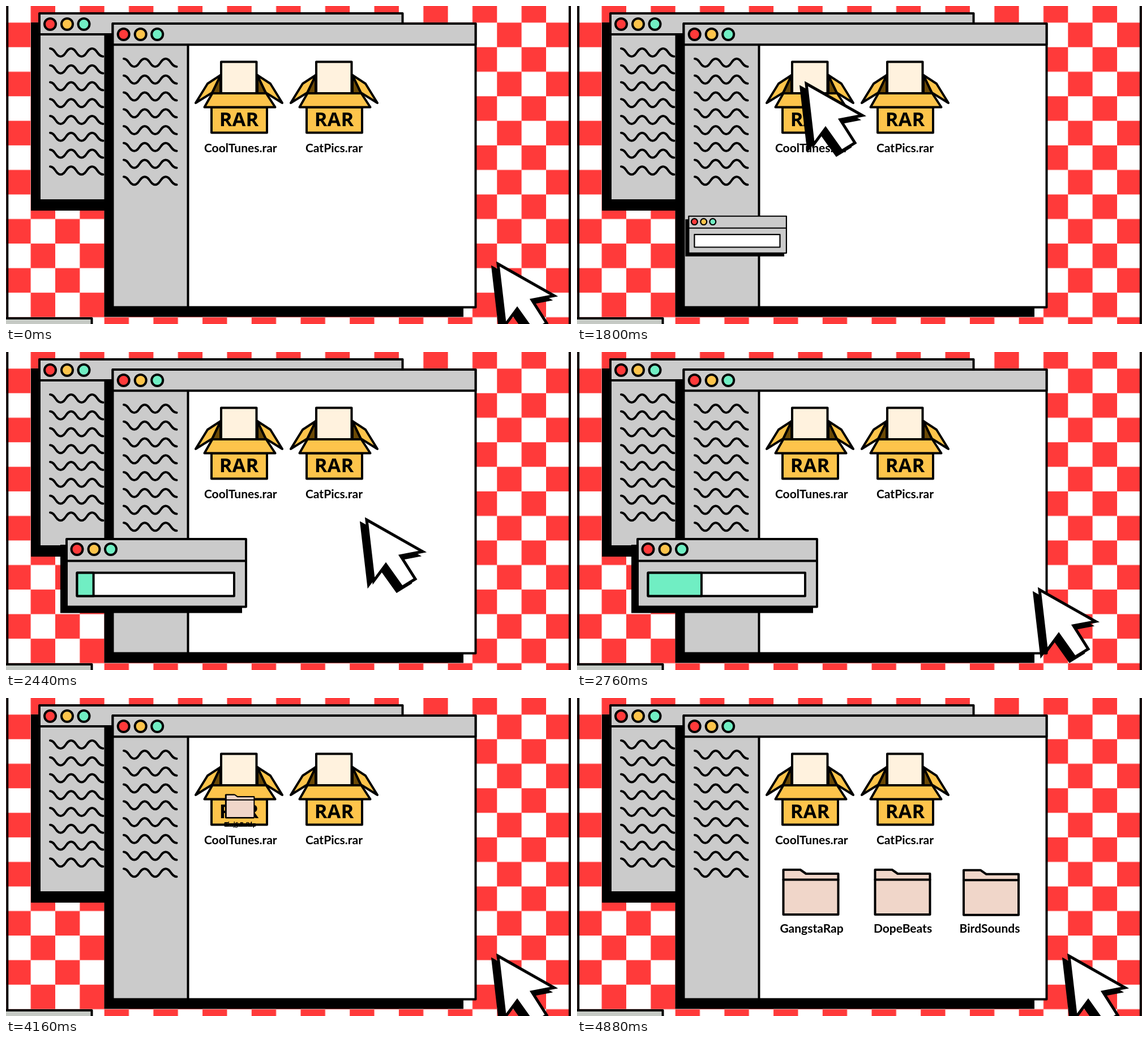
Recreate the animation shown at these times as an HTML page. Size 998 by 561 pixels, loop 6240 ms.

```html
<!DOCTYPE html>
<html lang="en">
<head>
<meta charset="utf-8">
<title>Unpacking an archive</title>
<style>
  html, body { margin: 0; width: 100%; height: 100%; overflow: hidden; background: #fff; }
  svg { display: block; width: 100vw; height: 100vh; }
  .line { stroke: #000; stroke-width: 4; stroke-linejoin: round; stroke-linecap: round; }
  .grey { fill: #cbcbcb; }
  .white { fill: #fff; }
  .yellow { fill: #fdc44b; }
  .brown { fill: #6b4a06; }
  .cream { fill: #fff2de; }
  .pink { fill: #f0d6c9; }
  .red { fill: #ff3a3a; }
  .teal { fill: #70eec3; }
  .none { fill: none; }
  text { text-anchor: middle; font: 700 21px Lato, sans-serif; }
  .tag { font: 700 34.5px "Open Sans", "Noto Sans", sans-serif; }
</style>
</head>
<body>
<svg viewBox="0 0 998 561" preserveAspectRatio="none">
  <defs>
    <pattern id="checks" x="0.3" y="-14" width="86.7" height="86.62" patternUnits="userSpaceOnUse">
      <path class="red" d="M43.35 0h43.35v43.31h-43.35zM0 43.31h43.35v43.31H0z"/>
    </pattern>
    <g id="lights" class="line">
      <circle class="red" r="10"/>
      <circle class="yellow" cx="30" r="10"/>
      <circle class="teal" cx="59.5" r="10"/>
    </g>
    <path id="wave" class="line none" d="M0 0c9 0 9.5 14 18.5 14s9.5-14 18.5-14 9.5 14 18.5 14 9.5-14 18.5-14 9.5 14 19.5 14"/>
    <g id="box" class="line">
      <path class="brown" d="M-32.5 122v32h-15zM32.5 122v32h15z"/>
      <path class="yellow" d="M-32.5 122l-23 15-21 34 29-18zM32.5 122l23 15 21 34-29-18z"/>
      <path class="cream" d="M-31.5 98.5h62.5v56h-62.5z"/>
      <path class="yellow" d="M-48.5 178.5h98v45h-98z"/>
      <path class="yellow" d="M-47 154h95l16 24.5h-125z"/>
    </g>
    <g id="folder" class="line pink">
      <path d="M-48.5 39.5v-79h30l10 7h57v72z"/>
      <path d="M-48.5-22h97"/>
    </g>
    <path id="arrow" stroke="#000" stroke-width="5" stroke-miterlimit="8" d="M0 0L99 56 60 63.5 86 104.5 62.5 119 34 79 12.5 108z"/>
  </defs>

  <rect width="998" height="561" fill="url(#checks)"/>
  <path class="line none" d="M2.3-5v571M995.8-5v571"/>
  <path class="line" fill="#c6cac5" d="M-10 551H151.5V580H-10z"/>

  <path d="M44 29h636v332H44z"/>
  <path class="line grey" d="M59 13h641.5v330H59zM59 50h641"/>
  <use href="#lights" x="78" y="32"/>
  <g id="backWaves"></g>

  <path d="M173.5 48H808v500.5H173.5z"/>
  <path class="line white" d="M188.5 31H829.5V531.5H188.5z"/>
  <path class="line grey" d="M188.5 31h641v37.300h-641zM188.500 68.300h133v463.200h-133z"/>
  <use href="#lights" x="207.700" y="50"/>
  <g id="frontWaves"></g>

  <use href="#box" x="411.500"/>
  <use href="#box" x="579.500"/>
  <text class="tag" x="411.500" y="212">RAR</text>
  <text class="tag" x="579.500" y="212">RAR</text>
  <text x="414.300" y="258">CoolTunes.rar</text>
  <text x="579.500" y="258">CatPics.rar</text>

  <g id="folders">
    <g><use href="#folder"/><text x="1.500" y="71.500">GangstaRap</text></g>
    <g><use href="#folder"/><text x="0.500" y="71.500">DopeBeats</text></g>
    <g><use href="#folder"/><text x="-2.500" y="71">BirdSounds</text></g>
  </g>

  <g id="popup">
    <path d="M96 340h321v120.500H96z"/>
    <path class="line grey" d="M107 330H424v119.500H107zM107 368.500H424"/>
    <use href="#lights" x="125.500" y="348"/>
    <path class="line white" d="M125.500 389.500H403v41H125.500z"/>
    <rect id="fill" class="line teal" x="125.500" y="389.500" height="41"/>
  </g>

  <g id="cursor">
    <use href="#arrow" x="-9" y="7"/>
    <use href="#arrow" fill="#fff"/>
  </g>
</svg>
<script>
const LOOP = 6240, STEP = 40;
const $ = id => document.getElementById(id);
const mix = (a, b, k) => a + (b - a) * k;

// Symmetric cubic-bezier(h, 0, 1 - h, 1) between two times
function ease(now, from, to, h) {
  const p = (now - from) / (to - from);
  if (p <= 0) return 0;
  if (p >= 1) return 1;
  let lo = 0, hi = 1;
  for (let i = 0; i < 24; i++) {
    const s = (lo + hi) / 2, r = 1 - s;
    const x = 3 * s * r * r * h + 3 * s * s * r * (1 - h) + s * s * s;
    if (x < p) lo = s; else hi = s;
  }
  return lo * lo * (3 - 2 * lo);
}

function place(el, x, y, scale = 1) {
  el.setAttribute("transform", `translate(${x} ${y}) scale(${scale})`);
}

function addWaves(id, x, y) {
  let rows = "";
  for (let i = 0; i < 8; i++) rows += `<use href="#wave" x="${x}" y="${y + i * 29.75}"/>`;
  $(id).innerHTML = rows;
}
addWaves("backWaves", 78, 75);
addWaves("frontWaves", 208, 93);

const spots = [[413, 342.5], [575, 342.5], [731.5, 343.3]];
const cards = [...$("folders").children];

function draw(t) {
  const reach = ease(t, 680, 1560, 0.65) - ease(t, 1840, 3040, 0.42);
  place($("cursor"), mix(869, 405, reach), mix(455, 137, reach));

  const grow = ease(t, 1640, 2320, 0.6), size = mix(0.51, 1, grow);
  const cx = 265.5, cy = 389.7;
  place($("popup"), cx + mix(19.5, 0, grow) - cx * size, cy + mix(14.6, 0, grow) - cy * size, size);
  $("popup").style.display = t >= 1800 && t < 4160 ? "" : "none";
  $("fill").setAttribute("width", 277.5 * ease(t, 1880, 3920, 0.589));

  const spread = ease(t, 4120, 4880, 0.6);
  cards.forEach((card, i) => {
    const [x, y] = spots[i];
    place(card, mix(412.7, x, spread), mix(190.5, y, spread), mix(0.51, 1, spread));
  });
  $("folders").style.display = t >= 4160 ? "" : "none";
}

const start = performance.now();
function tick() {
  const t = (performance.now() - start) % LOOP;
  draw(Math.floor(t / STEP) * STEP);
  requestAnimationFrame(tick);
}
tick();
</script>
</body>
</html>
```
